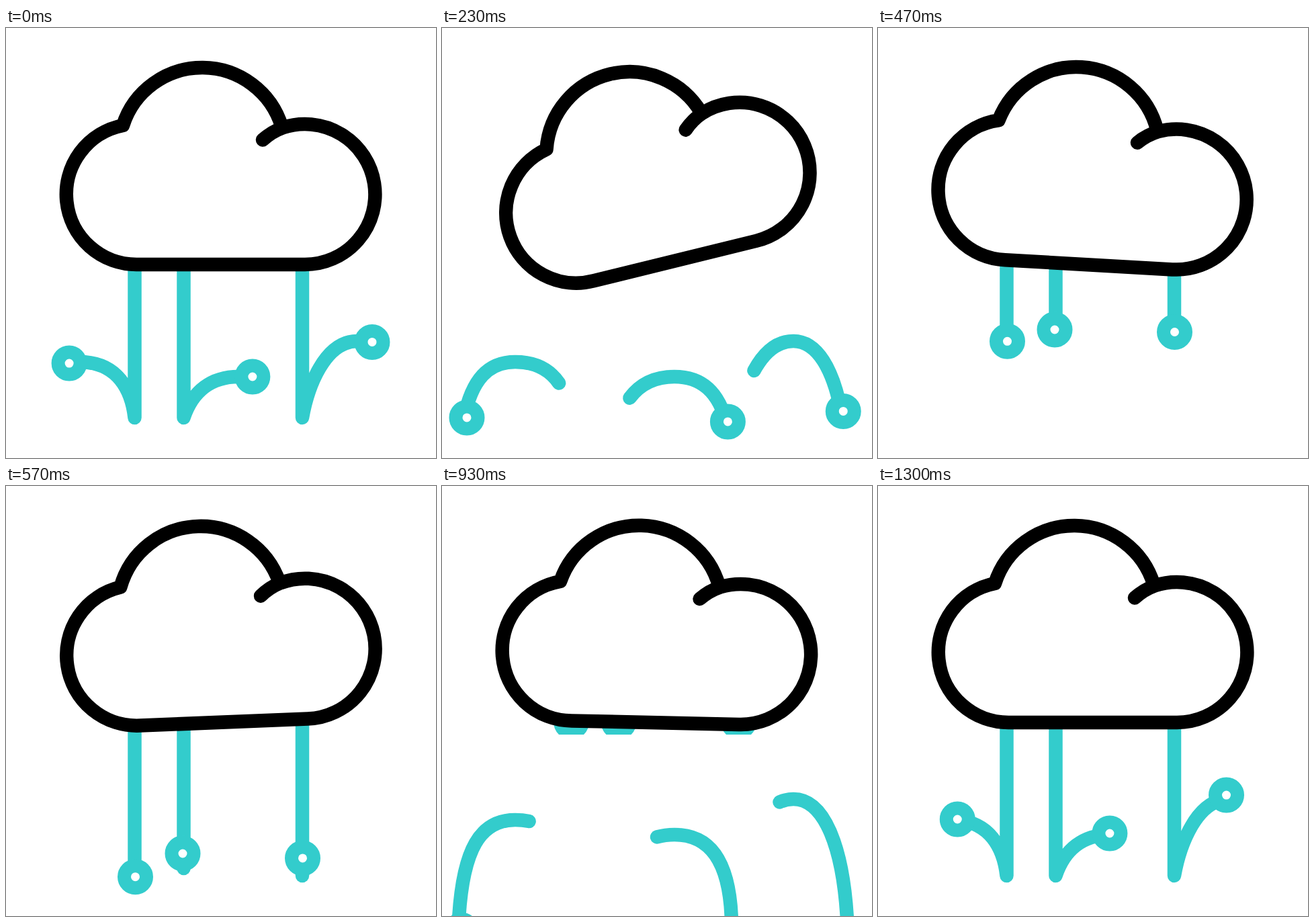
Animation, 640 px wide and 640 px high, one loop 1330 ms. Source, as an HTML page:

```html
<!DOCTYPE html>
<html lang="en">
<head>
<meta charset="utf-8">
<title>Rain cloud</title>
<style>
  html, body { margin: 0; height: 100%; overflow: hidden; background: #fff; }
  svg { display: block; width: 100vw; height: 100vh; }
  path, circle { stroke-width: 20.5; stroke-linecap: round; stroke-linejoin: round; }
  #rain path { fill: none; stroke: #3cc; }
  #rain circle { fill: #fff; stroke: #3cc; stroke-width: 20; }
  #cloud { fill: #fff; stroke: #000; }
</style>
</head>
<body>
<svg viewBox="0 0 640 640">
  <clipPath id="rim"><rect width="640" height="370"/></clipPath>
  <g id="rain"></g>
  <path id="cloud" d="M382 166.5Q396 154 412 148.3A104.5 104.5 0 1 1 444.5 352H195.5A104.5 104.5 0 0 1 174 145A123.9 123.9 0 0 1 410.5 147"/>
</svg>
<script>
const LOOP = 1330, FRAMES = 40;
const rain = document.getElementById('rain');
const cloud = document.getElementById('cloud');

// Each route is a fall, a rise to the apex, a descent and a run below the stage.
const drops = [
  { trail: ['M191.5 352V580', 'C187 540 167 497 109 497', 'C57 497 31 540 25 645', 'v60'],
    ball: ['M192.5 351V584', 'C187 540 165 496 117 496', 'C62 496 35 540 29 645', 'v60'],
    fall: .99, head: .97, exit: 3.27, tail: [1.42, .5, 1.84] },
  { trail: ['M264.5 352V580', 'C278 540 306 519 346 519', 'C397 519 429 556 431 650', 'v60'],
    ball: ['M263 351V575', 'C275 540 306 517 346 517', 'C395 517 430 545 432 645', 'v60'],
    fall: .875, head: .952, exit: 3.6, tail: [1.3, .46, 1.76] },
  { trail: ['M441 352V580', 'C449 535 474 466 523 466', 'C570 466 597 540 603 645', 'v60'],
    ball: ['M441.5 351V575', 'C448 530 480 460 520 460', 'C565 460 606 530 601 645', 'v60'],
    fall: .906, head: 1, exit: 3.6, tail: [1.49, .53, 1.86] }
];

const linear = u => u;
const smooth = u => u * u * (3 - 2 * u);

function track(keys, x, ease = linear) {
  if (x <= keys[0][0]) return keys[0][1];
  for (let i = 1; i < keys.length; i++) {
    const [a, from] = keys[i - 1], [b, to] = keys[i];
    if (x <= b) return from + (to - from) * ease((x - a) / (b - a));
  }
  return keys[keys.length - 1][1];
}

function add(name) {
  return rain.appendChild(document.createElementNS('http://www.w3.org/2000/svg', name));
}

// Builds a path and a map from leg number to distance along it.
function route(legs) {
  const el = add('path');
  const marks = [[0, 0]];
  legs.forEach((_, i) => {
    el.setAttribute('d', legs.slice(0, i + 1).join(''));
    marks.push([i + 1, el.getTotalLength()]);
  });
  return { el, length: p => track(marks, p) };
}

function makeDrop(drop, ball, head, tail, maxX) {
  const trail = route(drop.trail), guide = route(drop.ball), dot = add('circle');
  guide.el.remove();
  dot.setAttribute('r', 16.5);
  return (frame, active) => {
    const p = track(ball, frame);
    const start = trail.length(track(tail, frame));
    const size = trail.length(track(head, frame)) - start;
    const at = guide.el.getPointAtLength(guide.length(p));
    trail.el.style.display = active && size > 0 ? '' : 'none';
    trail.el.setAttribute('stroke-dasharray', `${Math.max(size, 0)} 9999`);
    trail.el.setAttribute('stroke-dashoffset', -start);
    dot.style.display = active ? '' : 'none';
    dot.setAttribute('cx', Math.min(at.x, maxX));
    dot.setAttribute('cy', at.y);
    dot.setAttribute('clip-path', p > 0 ? 'none' : 'url(#rim)');
  };
}

const slowBall = [[28, 0], [34, 1], [39, 1.99], [40, 2.12], [47, 2.66], [51, 3], [55, 4]];
const slow = drops.map(d => makeDrop(d, slowBall, slowBall,
  [[40, 0], [45.8, 1], [47, d.tail[0]], [51, 2.43], [54.5, 3.2]], 640));

const fast = drops.map(d => {
  const flight = [[22, 1.83], [27, 2.87], [28, d.exit], [30, 4]];
  return makeDrop(d, [[11, 0], [17, d.fall], ...flight], [[11, 0], [17, d.head], ...flight],
    [[19, 0], [22, d.tail[1]], [25.1, 1], [28, d.tail[2]], [34, 3.2]], 587);
});

const sway = [[0, 0], [6.3, -15], [11.2, 6.4], [18.7, -3.6], [26, 1.7], [32, 0]];

function draw(now) {
  // 30 frames a second, timed in hundredths
  const frame = Math.floor((Math.floor(now % LOOP / 10) + .34) * .3);
  const late = frame < 28 ? frame + FRAMES : frame;
  slow.forEach(move => move(late, late < 55));
  fast.forEach(move => move(frame, frame > 11 && frame < 34));
  cloud.setAttribute('transform', `rotate(${track(sway, frame, smooth)} 311 239)`);
}

const begin = performance.now();
function tick() {
  draw(performance.now() - begin);
  requestAnimationFrame(tick);
}
tick();
</script>
</body>
</html>
```
